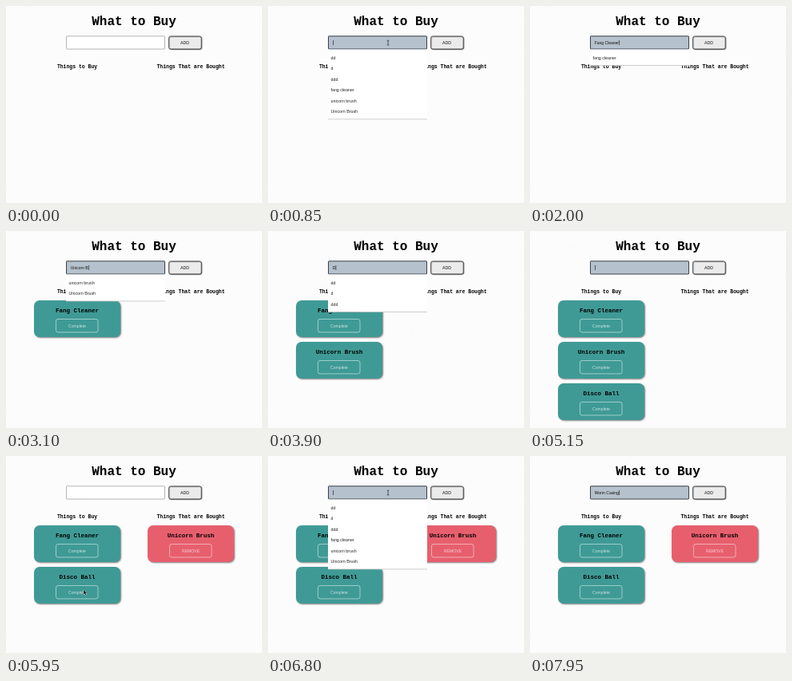
Write an HTML page with a canvas that moves like this. It is 320 px wide and 247 px high and loops after 8 s.

```html
<!DOCTYPE html>
<html lang="en">
<head>
<meta charset="utf-8">
<title>What to Buy</title>
<style>
  html, body { margin: 0; height: 100%; overflow: hidden; background: #fdfcfd; }
  canvas { display: block; width: 320px; height: 247px; }
</style>
</head>
<body>
<canvas id="stage"></canvas>
<script>
const LOOP = 8000, W = 320, H = 247;
const MONO = '"Liberation Mono", monospace';
const SANS = '"Liberation Sans", sans-serif';
const TEAL = '#3f9a95', RED = '#e75f6d';

const canvas = document.getElementById('stage');
const ctx = canvas.getContext('2d');
const ratio = window.devicePixelRatio || 1;
canvas.width = W * ratio;
canvas.height = H * ratio;

// Each entry is typed from first to last key, then submitted at end.
const entries = [
  { text: 'Fang Cleaner', first: 1000, last: 2000, end: 2200 },
  { text: 'Unicorn Brush', first: 2400, last: 3370, end: 3800 },
  { text: 'Disco Ball', first: 3880, last: 4700, end: 4950 },
  { text: 'Worm Casing', first: 7000, last: 7880, end: LOOP }
];
const history = ['dd', 'd', 'ddd', 'fang cleaner', 'unicorn brush', 'Unicorn Brush'];
const BOUGHT_AT = 5750;
const focusSpans = [[800, BOUGHT_AT], [6800, LOOP]];
const moves = [
  { start: 50, end: 550, hide: 1000, from: [264, 124], to: [150, 46] },
  { start: 5180, end: 5600, hide: 6350, from: [150, 46], to: [97, 168] },
  { start: 6350, end: 6600, hide: 7000, from: [97, 168], to: [150, 46] }
];

function label(text, x, y, font, color = '#000', align = 'left') {
  ctx.font = font;
  ctx.fillStyle = color;
  ctx.textAlign = align;
  ctx.fillText(text, x, y);
}

function box(x, y, w, h, radius, fill, stroke, lineWidth = 1) {
  ctx.beginPath();
  ctx.roundRect(x, y, w, h, radius);
  if (fill) { ctx.fillStyle = fill; ctx.fill(); }
  if (stroke) { ctx.strokeStyle = stroke; ctx.lineWidth = lineWidth; ctx.stroke(); }
}

function shadowed(blur, offset, color, draw) {
  ctx.save();
  ctx.shadowColor = color;
  ctx.shadowBlur = blur * ratio;
  ctx.shadowOffsetX = ctx.shadowOffsetY = offset * ratio;
  draw();
  ctx.restore();
}

function drawPaper() {
  ctx.fillStyle = '#fdfcfd';
  ctx.fillRect(0, 0, W, H);
  let seed = 7;
  const random = () => (seed = seed * 16807 % 2147483647) / 2147483647;
  ctx.fillStyle = '#f5f4f5';
  for (let i = 0; i < 130; i++) ctx.fillRect(random() * W, random() * H, 1, 1);
}

function drawCard(name, x, y, color, action) {
  shadowed(2, 1, 'rgba(0,0,0,.5)', () => box(x, y, 108, 46, 7, color));
  label(name, x + 54, y + 14.6, 'bold 7.5px ' + MONO, '#000', 'center');
  box(x + 27.5, y + 23.5, 52.5, 16.5, 2.5, null, 'rgba(255,255,255,.55)', 0.9);
  label(action, x + 54, y + 33.8, '5.1px ' + SANS, 'rgba(255,255,255,.72)', 'center');
}

function drawCards(t) {
  const added = entries.filter(e => t >= e.end).map(e => e.text);
  const bought = t >= BOUGHT_AT ? added.splice(1, 1) : [];
  added.forEach((name, i) => drawCard(name, 35, 87 + i * 52, TEAL, 'Complete'));
  bought.forEach(name => drawCard(name, 177, 87, RED, 'REMOVE'));
}

function typedText(t) {
  const entry = entries.find(e => t >= e.first && t < e.end);
  if (!entry) return '';
  const step = (entry.last - entry.first) / (entry.text.length - 1);
  return entry.text.slice(0, Math.floor((t - entry.first) / step + 1e-6) + 1);
}

function suggestions(t, typed) {
  if (typed) return history.filter(s => s.toLowerCase().startsWith(typed.toLowerCase()));
  const opened = t < 1000 || t >= 6800;
  return opened ? history : [];
}

function drawForm(t) {
  const focused = focusSpans.some(([a, b]) => t >= a && t < b);
  box(75.5, 37.8, 123, 16.2, 0.5, focused ? '#b5c1cc' : '#fff', focused ? '#39424a' : '#b5b5b5');
  shadowed(1, 0.6, 'rgba(0,0,0,.55)', () =>
    box(203.4, 37.9, 40.8, 16, 2.5, '#ebebeb', '#555', 0.9));
  label('ADD', 223.5, 47.7, '5.2px ' + SANS, '#111', 'center');
  if (!focused) return;

  const typed = typedText(t);
  label(typed, 80.7, 47.7, '5px ' + SANS, '#111');
  ctx.fillRect(81 + ctx.measureText(typed).width, 43, 0.6, 6);

  const list = suggestions(t, typed);
  if (!list.length) return;
  const height = 6.5 + list.length * 13.5;
  ctx.fillStyle = '#fff';
  ctx.fillRect(75, 54.5, 124, height);
  ctx.fillStyle = '#c2c2c2';
  ctx.fillRect(75, 54 + height, 124, 0.8);
  list.forEach((item, i) => label(item, 78.5, 66.8 + i * 13.5, '5.3px ' + SANS, '#222'));
}

function drawPointer(t) {
  const move = moves.find(m => t >= m.start && t < m.hide);
  if (!move) return;
  const p = Math.min(1, (t - move.start) / (move.end - move.start));
  const eased = p * p * (3 - 2 * p);
  const [x, y] = move.from.map((v, i) => v + (move.to[i] - v) * eased);
  const overInput = x > 75 && x < 199 && y > 37 && y < 54;
  ctx.save();
  ctx.translate(x, y);
  if (overInput) {
    ctx.fillStyle = '#222';
    ctx.fillRect(-0.3, -3, 0.7, 6);
    ctx.fillRect(-1.3, -3.2, 2.6, 0.6);
    ctx.fillRect(-1.3, 2.7, 2.6, 0.6);
  } else {
    const arrow = new Path2D('M0 0V5.4L1.3 4.2L2.2 6.2L3.2 5.8L2.3 3.9H4Z');
    ctx.strokeStyle = '#fff';
    ctx.lineWidth = 0.8;
    ctx.stroke(arrow);
    ctx.fillStyle = '#111';
    ctx.fill(arrow);
  }
  ctx.restore();
}

function render(t) {
  ctx.setTransform(ratio, 0, 0, ratio, 0, 0);
  drawPaper();
  label('What to Buy', 160, 23.5, 'bold 16px ' + MONO, '#000', 'center');
  label('Things to Buy', 89, 77.5, 'bold 6.45px ' + MONO, '#000', 'center');
  label('Things That are Bought', 231, 77.5, 'bold 6.45px ' + MONO, '#000', 'center');
  drawCards(t);
  drawForm(t);
  drawPointer(t);
}

const startTime = performance.now();
function tick() {
  render((performance.now() - startTime) % LOOP);
  requestAnimationFrame(tick);
}
tick();
</script>
</body>
</html>
```
